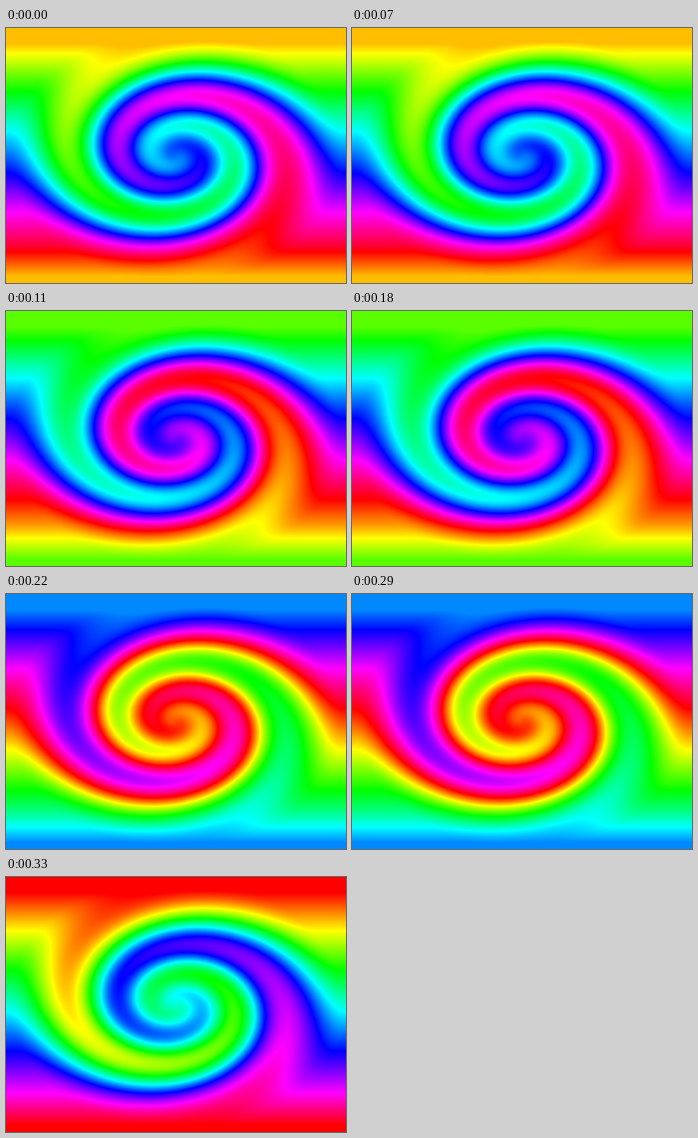
Animation of 512 by 384 pixels, one loop 440 ms. Source, as an HTML page with a canvas:

```html
<!DOCTYPE html>
<html lang="en">
<head>
<meta charset="utf-8">
<title>Rainbow twirl</title>
<style>
  html, body { margin: 0; width: 100%; height: 100%; overflow: hidden; background: #f00; }
  canvas { display: block; width: 100vw; height: 100vh; }
</style>
</head>
<body>
<canvas id="stage" width="512" height="384"></canvas>
<script>
const canvas = document.getElementById('stage');
const ctx = canvas.getContext('2d');
const W = canvas.width, H = canvas.height;

const STEP_MS = 110;
const HUE_SHIFTS = [45, 99, 208, 0];
const TWIRL = 580 * Math.PI / 180;
// Heights at which the vertical spectrum passes red, yellow, green, cyan, blue, magenta, red.
const STOPS = [24, 81, 140, 203, 262, 325, 374];

function spectrumHue(y) {
  if (y <= STOPS[0]) return 0;
  for (let i = 1; i < STOPS.length; i++) {
    if (y < STOPS[i]) return 60 * (i - 1 + (y - STOPS[i - 1]) / (STOPS[i] - STOPS[i - 1]));
  }
  return 360;
}

// Elliptical twirl that fades to nothing at the edges of the stage.
function twirledHue(px, py) {
  const x = (px + 0.5) * 2 / W - 1;
  const y = (py + 0.5) * 2 / H - 1;
  const angle = TWIRL * Math.max(0, 1 - Math.hypot(x, y)) ** 2;
  const sourceY = x * Math.sin(angle) + y * Math.cos(angle);
  return spectrumHue((sourceY + 1) * H / 2);
}

function channel(hue, offset) {
  const k = (hue / 60 + offset) % 6;
  return 255 * (1 - Math.max(0, Math.min(k, 4 - k, 1)));
}

const hues = Float32Array.from({ length: W * H }, (_, i) => twirledHue(i % W, Math.floor(i / W)));

function paint(shift) {
  const image = ctx.createImageData(W, H);
  hues.forEach((base, i) => {
    const hue = base + shift;
    image.data[4 * i] = channel(hue, 5);
    image.data[4 * i + 1] = channel(hue, 3);
    image.data[4 * i + 2] = channel(hue, 1);
    image.data[4 * i + 3] = 255;
  });
  return image;
}

const images = HUE_SHIFTS.map(paint);
const start = performance.now();
let shown = -1;

function tick() {
  const step = Math.floor((performance.now() - start) / STEP_MS) % images.length;
  if (step !== shown) {
    ctx.putImageData(images[step], 0, 0);
    shown = step;
  }
  requestAnimationFrame(tick);
}
tick();
</script>
</body>
</html>
```
